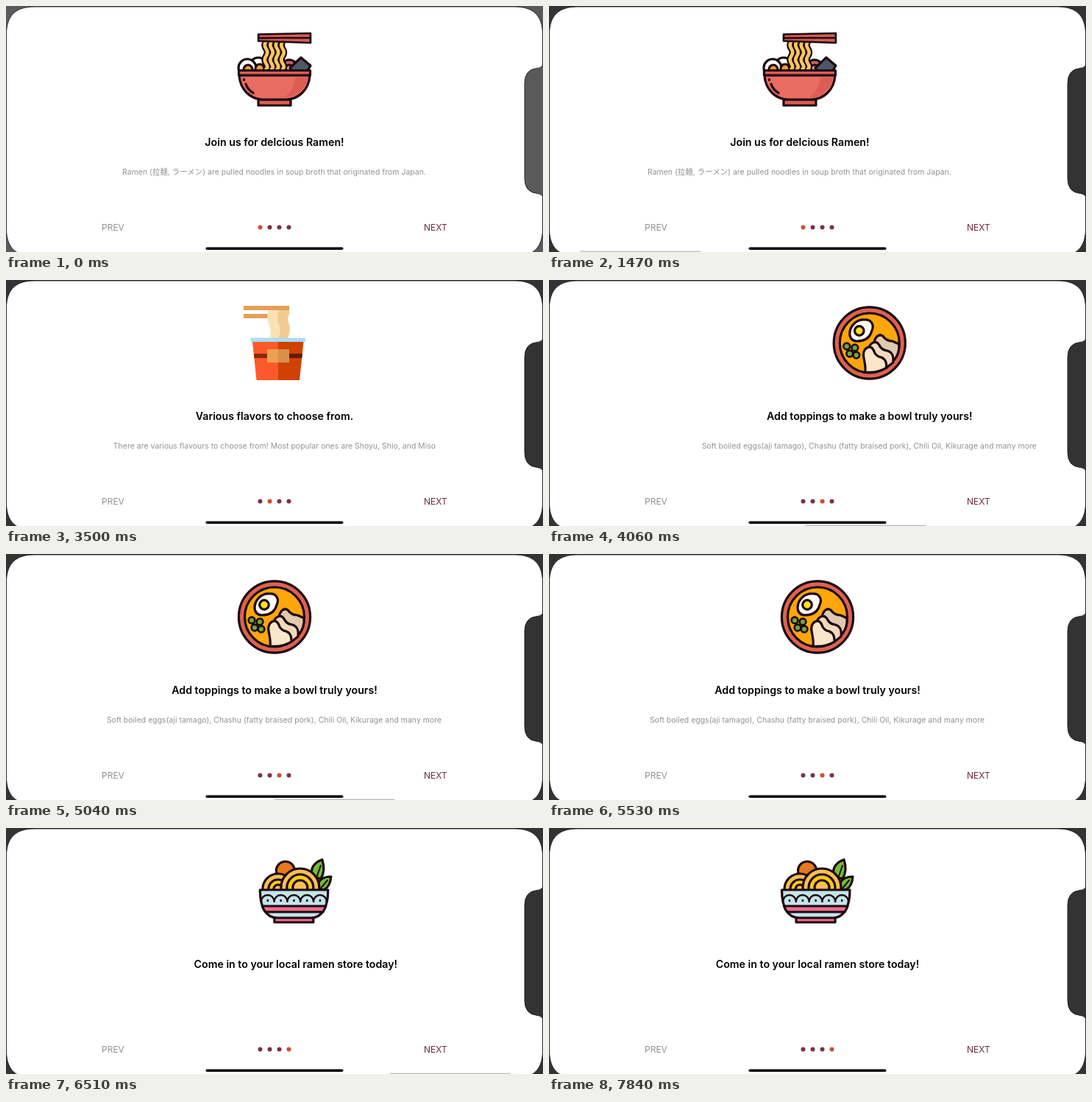
Recreate the animation shown at these times as an HTML page. Size 730 px wide and 334 px high, loop 7.91 s.

```html
<!DOCTYPE html>
<html lang="en">
<head>
<meta charset="utf-8">
<title>Ramen onboarding</title>
<style>
html, body { margin: 0; width: 100%; height: 100%; overflow: hidden; background: #fff; }
svg { display: block; width: 730px; height: 334px; font-family: Inter, "Noto Sans CJK JP", "Noto Sans CJK", sans-serif; }
.title { font-size: 14.2px; font-weight: 600; text-anchor: middle; }
.note { font-size: 10.4px; fill: #929292; letter-spacing: .05px; text-anchor: middle; }
.nav { font-size: 12px; }
.ink { stroke: #1d080f; stroke-width: 3.2; stroke-linejoin: round; stroke-linecap: round; }
.line { fill: none; }
</style>
</head>
<body>
<svg viewBox="0 0 730 334">
  <rect width="730" height="334" fill="#fff"/>
  <g id="pages">
    <g>
      <g class="ink">
        <g fill="#fff"><circle cx="343" cy="82" r="12"/><circle cx="328" cy="84" r="12"/></g>
        <g fill="#f39a32"><circle cx="345" cy="85" r="6"/><circle cx="329" cy="86" r="6"/></g>
        <circle cx="385" cy="84" r="11" fill="#bd6866"/>
        <circle cx="385" cy="85" r="5" fill="#e9a29a"/>
        <path d="M386 84L401 70L414 81L408 91H391Z" fill="#4d5768"/>
        <g id="noodles" class="line"></g>
        <path d="M343 38.500L414 37V43L343 43.500ZM343 43.500L414 43V50L343 47.500Z" fill="#d65c58" stroke-width="2.600"/>
        <path d="M343 127H387V135H343Z" fill="#dc5d55"/>
        <path d="M317 94H413C412 114 397 127 381 127H349C333 127 318 114 317 94Z" fill="#e96b62"/>
        <path d="M393 97H410C406 114 395 124 379 124Q392 113 393 97Z" fill="#dc5d55" stroke="none"/>
        <path d="M316.500 87.500H413.500V94H316.500Z" fill="#dc5d55"/>
        <path class="line" d="M323.500 99.500V100.500M326 106Q329 114 336 118"/>
      </g>
      <text class="title" x="365" y="190">Join us for delcious Ramen!</text>
      <text class="note" x="364.500" y="229">Ramen (拉麺, ラーメン) are pulled noodles in soup broth that originated from Japan.</text>
    </g>
    <g>
      <path d="M323 35H385V41H323ZM323 46H360V52H323Z" fill="#e2a05c"/>
      <path d="M356 41H385V46Q381 53 385 60Q387 69 383 79H358Q362 69 357 60Q354 52 356 41Z" fill="#fbe2b4"/>
      <path d="M371 41H385V46Q381 53 385 60Q387 69 383 79H370Q375 69 371 60Q367 51 371 41Z" fill="#efcb91"/>
      <path d="M335 84H370V136H340.500Z" fill="#fa5a2a"/>
      <path d="M370 84H404.500L399 136H370Z" fill="#cf4203"/>
      <path d="M337 100H370V106H337.500Z" fill="#8a2905"/>
      <path d="M370 100H403L402.300 106H370Z" fill="#641b02"/>
      <path d="M355 94H370V112H355Z" fill="#eda04f"/>
      <path d="M370 94H385V112H370Z" fill="#d99149"/>
      <path d="M332.500 78.500H407V84H332.500Z" fill="#a9ddf5"/>
      <text class="title" x="365" y="190">Various flavors to choose from.</text>
      <text class="note" x="365" y="229">There are various flavours to choose from! Most popular ones are Shoyu, Shio, and Miso</text>
    </g>
    <g>
      <g class="ink">
        <circle cx="365" cy="85.500" r="48.600" fill="#dc6252"/>
        <circle cx="365" cy="85.500" r="40.500" fill="#ffa60a"/>
        <path d="M338 73C338 62 348 53 358 54C367 53 372 61 368 69C365 80 356 83 348 83C342 83 338 79 338 73Z" fill="#fff"/>
        <circle cx="351" cy="69" r="6.300" fill="#ffe11c"/>
        <g fill="#6aa83c" stroke-width="2.600">
          <circle cx="334" cy="90" r="4.400"/><circle cx="345" cy="92" r="4.400"/>
          <circle cx="338" cy="100" r="4.400"/><circle cx="347" cy="102" r="4.400"/>
        </g>
        <path d="M371 88C371 79 377 72 383 76Q388 83 396 83L405 87Q406 99 399 108Z" fill="#dfc9af"/>
        <path d="M364 94C364 87 373 80 378 88Q381 95 389 96C397 98 398 106 397 112L388 119Z" fill="#f1dabc"/>
        <path d="M359 125C361 112 353 102 359 94C366 87 370 93 372 99Q375 104 381 105C388 108 388 114 388 119Q375 127 359 125Z" fill="#fbe6c9"/>
      </g>
      <text class="title" x="365" y="190">Add toppings to make a bowl truly yours!</text>
      <text class="note" x="364.500" y="229">Soft boiled eggs(aji tamago), Chashu (fatty braised pork), Chili Oil, Kikurage and many more</text>
    </g>
    <g>
      <g class="ink">
        <path d="M388 66C383 54 392 46 401 43Q406 58 399 69Z" fill="#72bd35"/>
        <path d="M395 83C394 69 404 66 413 66Q412 80 403 84Z" fill="#72bd35"/>
        <path class="line" d="M399 51L393 68M408 71L399 82" stroke-width="2"/>
        <circle cx="351" cy="58" r="12.500" fill="#e8781f"/>
        <g id="coils"></g>
        <path d="M336 121H389V128H336Z" fill="#ee7390"/>
        <path d="M316.500 84H409C409 107 401 122 386 122H340C324 122 316.500 107 316.500 84Z" fill="#c2e5ea"/>
        <path d="M319.500 106H406Q404 111 402 114H324Q321 111 319.500 106Z" fill="#ee6f8d"/>
        <path class="line" d="M318 100a8.900 9 0 0 1 17.800 0a8.900 9 0 0 1 17.800 0a8.900 9 0 0 1 17.800 0a8.900 9 0 0 1 17.800 0a8.900 9 0 0 1 17.800 0" stroke-width="2.400"/>
        <path class="line" d="M327 98V99M344.800 98V99M362.600 98V99M380.400 98V99M398.200 98V99" stroke-width="2.600"/>
      </g>
      <text class="title" x="365" y="190">Come in to your local ramen store today!</text>
    </g>
  </g>
  <text class="nav" x="130" y="305" fill="#929292">PREV</text>
  <text class="nav" x="568" y="305" fill="#702b40">NEXT</text>
  <g id="dots"></g>
  <rect id="bar" y="332.800" width="164" height="2" rx="1" fill="#b9b9b9"/>
  <rect x="271.500" y="327.500" width="187" height="3.600" rx="1.800"/>
  <g id="bezel" stroke="#1c1c1c" stroke-width=".9">
    <path fill-rule="evenodd" d="M-2 -2H732V336H-2ZM.5 39C.5 13 13 1 39 1H691C717 1 729.500 13 729.500 39V302C729.500 328 717 340 691 340H39C13 340 .5 328 .5 302Z"/>
    <path d="M731 76Q730 84 722 84.500Q705 86 705 105V234Q705 253 722 254.500Q730 255 731 263Z"/>
  </g>
</svg>
<script>
const LOOP = 7910, WIDTH = 730, DRAG = 300;
const $ = id => document.getElementById(id);
const clamp = v => Math.max(0, Math.min(1, v));

// Release time, settling constant and start of the scroll bar's fade.
const swipes = [
  { release: 1583, tau: 112, fade: 2600 },
  { release: 3821, tau: 133, fade: 5050 },
  { release: 5876, tau: 235, fade: 7070 }
];

const waves = [353.5, 361, 368.5, 376].map(x =>
  `M${x} 48q-3.500 5 0 10t0 10t0 10t0 8`).join("");
$("noodles").innerHTML =
  `<path d="${waves}" stroke-width="9"/><path d="${waves}" stroke="#f7c660" stroke-width="4.600"/>`;

const coil = (x, y, radii) => radii.map((r, i) =>
  `<circle cx="${x}" cy="${y}" r="${r}" fill="${i % 2 ? "#ffc915" : "#f8bf55"}"/>`).join("");
$("coils").innerHTML = coil(341, 83, [21, 13, 6]) + coil(371, 81, [26, 18, 10]);

[...$("pages").children].forEach((page, i) =>
  page.setAttribute("transform", `translate(${i * WIDTH})`));
$("dots").innerHTML = [0, 1, 2, 3].map(i =>
  `<circle cx="${345.5 + i * 13}" cy="300.500" r="3"/>`).join("");

// Accelerating drag, then an exponential glide at the same speed.
function travel(t, { release, tau }) {
  const rest = WIDTH - DRAG, length = 2 * DRAG * tau / rest;
  const u = t - release;
  if (u <= -length) return 0;
  if (u < 0) return DRAG * (1 + u / length) ** 2;
  const left = rest * Math.exp(-u / tau);
  return left < 1.5 ? WIDTH : WIDTH - left;
}

function draw(now) {
  const t = now % LOOP;
  const moved = swipes.map(s => travel(t, s));
  const offset = moved.reduce((a, b) => a + b);
  const page = Math.round(offset / WIDTH);
  const active = swipes.find((s, i) => moved[i] > 0 && t < s.fade + 250);
  $("pages").setAttribute("transform", `translate(${-offset})`);
  [...$("dots").children].forEach((dot, i) =>
    dot.setAttribute("fill", i === page ? "#cb5030" : "#7b3148"));
  $("bar").setAttribute("x", 37 + offset * .2244);
  $("bar").setAttribute("opacity", active ? 1 - clamp((t - active.fade) / 250) : 0);
  const grey = Math.round(90 - 39 * clamp((t - 630) / 420));
  $("bezel").setAttribute("fill", `rgb(${grey},${grey},${grey})`);
}

const start = performance.now();
function tick() {
  draw(performance.now() - start);
  requestAnimationFrame(tick);
}
tick();
</script>
</body>
</html>
```
